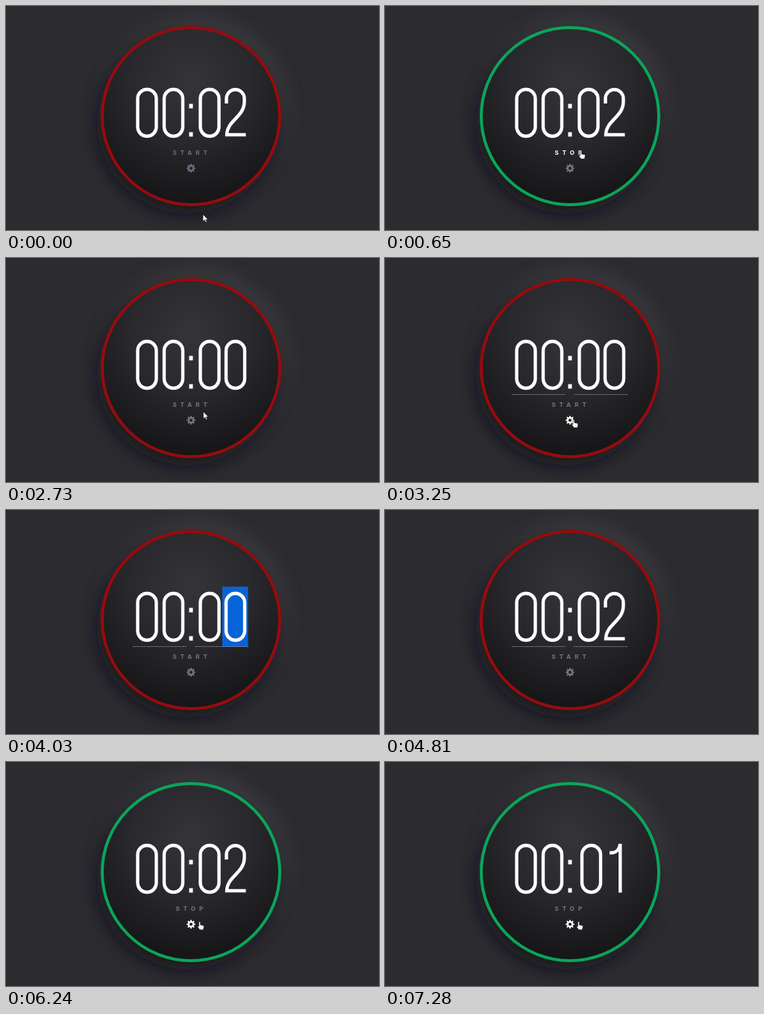
Animation of 500x301 px, one loop 8000 ms. Source, as an HTML page:

```html
<!DOCTYPE html>
<html lang="en">
<head>
<meta charset="utf-8">
<title>Timer</title>
<style>
  html, body { margin: 0; width: 100%; height: 100%; overflow: hidden; background: #2c2b30; }
  svg { display: block; width: 100%; height: 100%; }
  #label { font: 700 8px Inter, "Open Sans", sans-serif; letter-spacing: 5px; }
</style>
</head>
<body>
<svg viewBox="0 0 500 301" role="img" aria-label="Countdown timer">
  <defs>
    <radialGradient id="face" cx="0.5" cy="0.3" r="0.68">
      <stop offset="0" stop-color="#353539"/>
      <stop offset="0.5" stop-color="#29292d"/>
      <stop offset="1" stop-color="#161618"/>
    </radialGradient>
    <filter id="blur" x="-40%" y="-40%" width="180%" height="180%">
      <feGaussianBlur stdDeviation="12"/>
    </filter>
  </defs>
  <rect width="500" height="301" fill="#2c2b30"/>
  <circle cx="253" cy="138" r="122" fill="#47474c" opacity="0.65" filter="url(#blur)"/>
  <circle cx="243" cy="158" r="120" fill="#111113" opacity="0.75" filter="url(#blur)"/>
  <circle id="ring" cx="248" cy="148" r="119" fill="url(#face)" stroke-width="4"/>
  <rect id="select" x="290" y="103" width="34.5" height="81" fill="#0763d8"/>
  <g id="digits" fill="none" stroke="#fff" stroke-width="4.4"></g>
  <path d="M245.5 131.5h5v6h-5zM245.5 169.500h5v6h-5z" fill="#fff"/>
  <path id="lines" d="M170 183.500H242.500M253.500 183.500H326" stroke="#8b8b8e" stroke-dasharray="1.500 1"/>
  <text id="label" y="200"></text>
  <path id="gear" fill-rule="evenodd" transform="translate(248 218)"/>
  <path id="arrow" d="M0 0V9.500L2.200 7.500 3.700 10.800 5.300 10.100 3.800 6.900H6.800Z" fill="#fff" stroke="#111" stroke-width="0.6"/>
  <path id="hand" d="M-1 1Q0-.8 1 1V4.300L5 5.200Q6 5.500 5.800 7L5 11H.3L-2.600 7.200Q-3 5.800-1 6.500Z" fill="#fff" stroke="#111" stroke-width="0.6"/>
</svg>
<script>
const LOOP = 8000, STEP = 130;
const $ = id => document.getElementById(id);
const set = (id, attrs) => {
  for (const key in attrs) $(id).setAttribute(key, attrs[key]);
};
const show = (id, on) => set(id, { visibility: on ? 'visible' : 'hidden' });

// Digit strokes, centred on x = 0
const glyphs = {
  0: 'M-12.500 124.500a12.500 12.500 0 0 1 25 0V162.500a12.500 12.500 0 0 1-25 0Z',
  1: 'M-8 122H-4Q4.500 121 6.300 110V175.500',
  2: 'M-12 131V124.500a12 12.300 0 0 1 24 0V129C12 149-11.500 154-11.500 173H14'
};

// Start time, pointer shape, tip position
const pointer = [
  [0, 'arrow', 264, 280], [130, 'arrow', 265, 260], [260, 'arrow', 264, 226],
  [390, 'hand', 262, 197], [520, 'hand', 262.5, 194.5],
  [1690, 'hand', 263, 197], [1820, 'arrow', 264, 203], [1950, 'arrow', 264.5, 206.5],
  [2990, 'arrow', 258, 211], [3120, 'hand', 253, 217],
  [3380, 'arrow', 272, 200], [3510, 'none', 306, 150],
  [5460, 'arrow', 268, 194], [5590, 'arrow', 258, 207.5],
  [5720, 'hand', 259, 212], [5850, 'hand', 259.5, 214.5]
];

const counts = [[0, 2], [1560, 1], [2730, 0], [4550, 2], [7280, 1]];

const latest = (list, t) => list.filter(item => item[0] <= t).pop();
const within = (t, from, to) => t >= from && t < to;

function gearPath() {
  const points = [];
  for (let i = 0; i < 32; i++) {
    const angle = (i - 0.5) * Math.PI / 16;
    const r = i % 4 < 2 ? 6 : 4.2;
    points.push((r * Math.cos(angle)).toFixed(2) + ' ' + (r * Math.sin(angle)).toFixed(2));
  }
  return 'M' + points.join('L') + 'ZM2.100 0a2.100 2.100 0 1 0-4.200 0a2.100 2.100 0 1 0 4.200 0Z';
}

function drawDigits(last) {
  const shift = last === 1 ? 3.5 : 0;
  const places = [[0, 189], [0, 224.5], [0, 273 + shift], [last, last === 1 ? 309 : 307.5]];
  $('digits').innerHTML = places.map(([n, x]) =>
    `<path d="${glyphs[n]}" transform="translate(${x} 0)"/>`).join('');
}

let shown = -1;

function render(time) {
  const t = Math.floor(time % LOOP / STEP) * STEP;
  const count = latest(counts, t)[1];
  if (count !== shown) drawDigits(shown = count);

  const running = within(t, 520, 2730) || t >= 6240;
  const idle = t < STEP ? '#697080' : '#77777a';
  const labelHover = within(t, 390, 1820);
  const gearHover = within(t, 3120, 3380) || t >= 5720;

  set('ring', { stroke: running ? '#0ba55a' : '#970b0d' });
  $('label').textContent = running ? 'STOP' : 'START';
  set('label', { x: running ? 227.5 : 223.5, fill: labelHover ? '#fff' : idle });
  set('gear', { fill: gearHover ? '#fff' : idle });
  show('lines', within(t, 3250, 6240));
  show('select', within(t, 3900, 4550));

  const [, shape, x, y] = latest(pointer, t);
  for (const id of ['arrow', 'hand']) {
    show(id, id === shape);
    set(id, { transform: `translate(${x} ${y})` });
  }
}

set('gear', { d: gearPath() });
const start = performance.now();
function tick() {
  render(performance.now() - start);
  requestAnimationFrame(tick);
}
tick();
</script>
</body>
</html>
```
